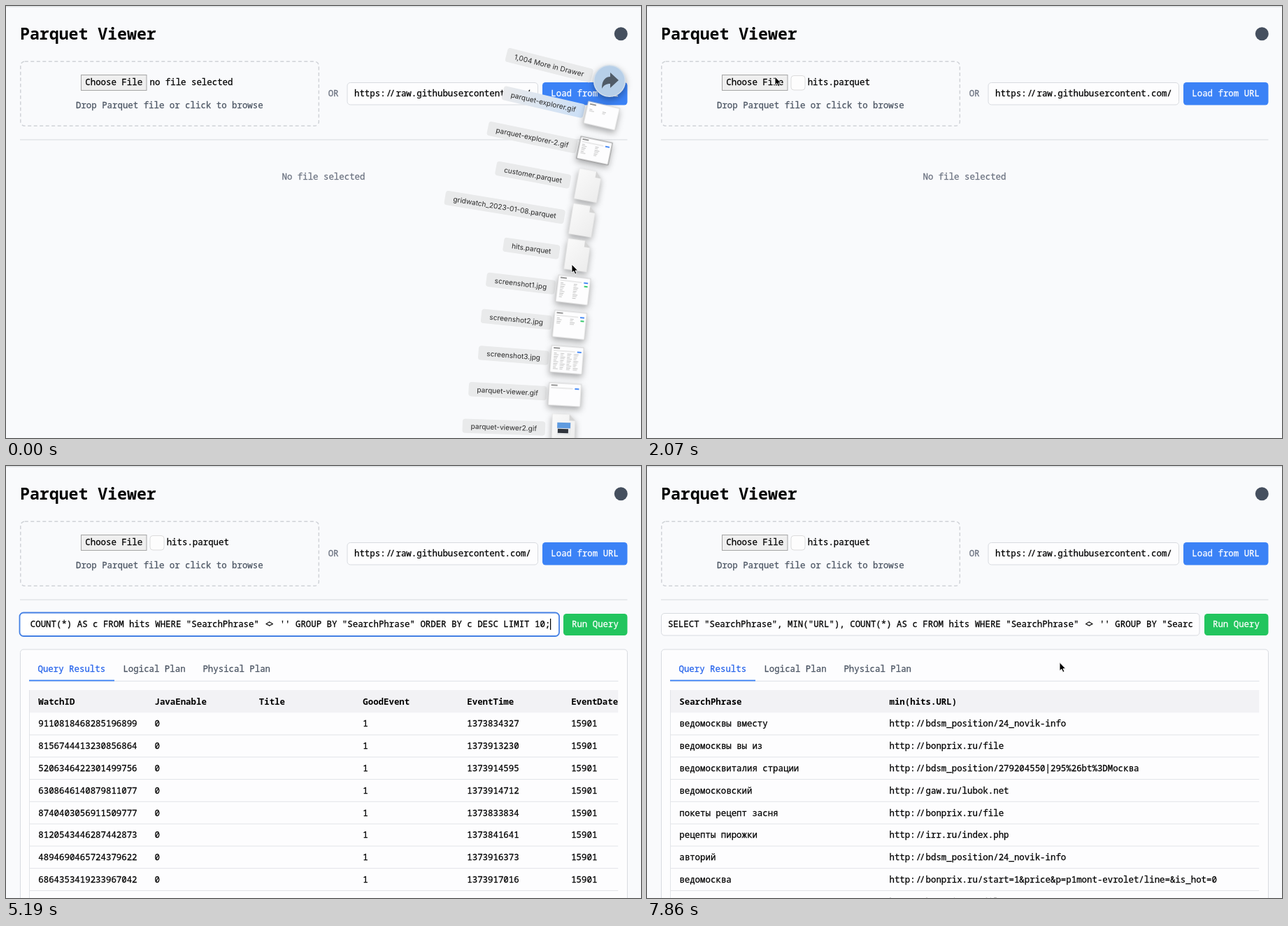
Write an HTML page that moves like this. It is 908 by 617 pixels and loops after 8000 ms.

```html
<!DOCTYPE html>
<html lang="en">
<head>
<meta charset="utf-8">
<title>Parquet Viewer</title>
<style>
  html, body { margin: 0; width: 100%; height: 100%; overflow: hidden; background: #f9fafc; }
  svg { display: block; width: 908px; height: 617px; }
  text { font: 12.4px "Noto Sans Mono", "DejaVu Sans Mono", monospace; white-space: pre; stroke-width: .28px; }
  .bold { font-weight: 600; stroke-width: 0; }
  .title { font-size: 23.2px; font-weight: 700; stroke-width: 0; }
  .label { font: 10.1px Inter, sans-serif; stroke-width: 0; }
  .shadow { filter: drop-shadow(0 4px 5px #0005); }
</style>
</head>
<body>
<script>
const STEP = 148.1, LOOP = 8000, CHAR = 7.44;
const INITIAL = 'select * from "hits" limit 10';
const QUERY = 'SELECT "SearchPhrase", MIN("URL"), COUNT(*) AS c FROM hits WHERE "SearchPhrase" <> \'\' ' +
  'GROUP BY "SearchPhrase" ORDER BY c DESC LIMIT 10;';

function el(parent, tag, attrs = {}, content) {
  const node = document.createElementNS('http://www.w3.org/2000/svg', tag);
  for (const key in attrs) node.setAttribute(key, attrs[key]);
  if (content !== undefined) node.textContent = content;
  return parent.appendChild(node);
}
const group = (parent, attrs) => el(parent, 'g', attrs);
const box = (parent, x, y, width, height, fill, attrs) =>
  el(parent, 'rect', { x, y, width, height, fill, ...attrs });
const path = (parent, d, attrs) => el(parent, 'path', { d, fill: 'none', ...attrs });
const show = (node, on) => node.setAttribute('display', on ? 'inline' : 'none');
const place = (node, x, y) => node.setAttribute('transform', `translate(${x} ${y})`);

// Pairs such as // and <> are drawn closer together, like a coding ligature
function text(parent, x, middle, content, fill = '#000', attrs) {
  const node = el(parent, 'text', { x, y: middle + 4.4, fill, stroke: fill, ...attrs });
  content.split(/(\/\/|<>)/).forEach((part, i) => {
    if (i % 2) {
      el(node, 'tspan', { dx: 1.2 }, part[0]);
      el(node, 'tspan', { dx: -2.4 }, part[1]);
    } else if (part) el(node, 'tspan', { dx: i ? 1.2 : 0 }, part);
  });
  return node;
}

const svg = el(document.body, 'svg', { viewBox: '0 0 908 617' });
const defs = el(svg, 'defs');
function clip(id, x, y, w, h) {
  box(el(defs, 'clipPath', { id }), x, y, w, h);
  return { 'clip-path': `url(#${id})` };
}
function gradient(id, from, to, x2, y2) {
  const g = el(defs, 'linearGradient', { id, x2, y2 });
  el(g, 'stop', { 'stop-color': from });
  el(g, 'stop', { offset: 1, 'stop-color': to });
}
gradient('paper', '#fafafa', '#ececec', 1, 1);
gradient('tinted', '#e9eaec', '#cbdff6', 1, 0);

// Page header
const page = group(svg);
const border = { stroke: '#d8dbe0', rx: 4.5 };
box(page, 0, 0, 908, 617, '#f9fafc');
box(page, 0, 0, 908, 1.5, '#dcdfe2');
text(page, 20, 43.8, 'Parquet Viewer', '#000', { class: 'title' });
el(page, 'circle', { cx: 879.3, cy: 39.7, r: 9.5, fill: '#454f5e' });
box(page, 20.8, 79.3, 426.5, 92, 'none', { rx: 6, stroke: '#d0d3d8', 'stroke-width': 1.5, 'stroke-dasharray': '5 3.5' });
const chooser = box(page, 107.5, 98.5, 93.5, 22, '#efefef', { stroke: '#a5a5a5' });
text(page, 113.3, 109, 'Choose File');
const noFile = text(page, 205.5, 109, 'no file selected');
const chosen = group(page);
box(chosen, 206, 99.5, 20, 20.5, '#fdfdfd', { rx: 4, stroke: '#dcdcdc' });
text(chosen, 229.7, 109, 'hits.parquet');
text(page, 100, 142, 'Drop Parquet file or click to browse', '#4b5563');
text(page, 460.7, 125, 'OR', '#6b7280');
box(page, 488, 109.5, 272.5, 31.5, '#fdfdfe', border);
text(page, 498, 125, 'https://raw.githubusercontent.com/');
box(page, 767, 109, 121.5, 32.5, '#3b82f6', { rx: 4.5 });
text(page, 779.3, 125, 'Load from URL', '#fff');
box(page, 20, 190.5, 868.5, 1, '#d8dbe0');
const empty = text(page, 394.5, 244, 'No file selected', '#6b7280');

// Query bar and results panel
const panel = group(page);
const input = box(panel, 20.5, 210.5, 769.5, 31.5, '#fdfdfe', border);
const ring = box(panel, 19.5, 209.5, 771.5, 33.5, '#fff', { rx: 5.5, stroke: '#4480e4', 'stroke-width': 1.8 });
const field = group(panel, clip('field', 30, 211, 751, 31));
const highlight = box(field, 30, 218, INITIAL.length * CHAR, 16.4, '#b4d5fe');
const initialQuery = text(field, 30, 226, INITIAL);
const query = text(field, 30, 226, QUERY);
const caret = box(panel, 778, 218, 1.2, 16, '#000');
const run = box(panel, 797, 211, 91.5, 31, '#22c55e', { rx: 4.5 });
text(panel, 809, 226, 'Run Query', '#fff');
box(panel, 20.5, 262, 868, 380, '#fdfdfe', border);
box(panel, 33, 306.7, 842.5, 1, '#dde0e5');
box(panel, 33, 305.5, 122, 1.8, '#3b82f6');
text(panel, 45.5, 289.5, 'Query Results', '#2563eb');
text(panel, 167.4, 289.5, 'Logical Plan', '#4b5563');
text(panel, 281.4, 289.5, 'Physical Plan', '#4b5563');

const tableClip = clip('table', 33, 320, 842.5, 297);
function table(columns, headers, rows) {
  const g = group(panel, tableClip);
  box(g, 33, 320, 842.5, 32.3, '#f2f2f5');
  box(g, 33, 320, 1, 297, '#e2e4e8');
  headers.forEach((h, i) => text(g, columns[i], 336.3, h, '#000', { class: 'bold' }));
  rows.forEach((row, r) => {
    const y = 368 + r * 31.78;
    row.forEach((cell, i) => text(g, columns[i], y, cell));
    box(g, 33, y + 15.5, 842.5, 1, '#e2e4e8');
  });
  return g;
}
const hits = [
  ['9110818468285196899', '1373834327'], ['8156744413230856864', '1373913230'],
  ['5206346422301499756', '1373914595'], ['6308646140879811077', '1373914712'],
  ['8740403056911509777', '1373833834'], ['8120543446287442873', '1373841641'],
  ['4894690465724379622', '1373916373'], ['6864353419233967042', '1373917016']
].map(([id, time]) => [id, '0', '', '1', time, '15901']);
const firstTable = table([46.3, 212.5, 361.8, 510.3, 659.3, 808.2],
  ['WatchID', 'JavaEnable', 'Title', 'GoodEvent', 'EventTime', 'EventDate'], hits);
const secondTable = table([46.3, 346.5], ['SearchPhrase', 'min(hits.URL)'], [
  ['ведомосквы вместу', 'http://bdsm_position/24_novik-info'],
  ['ведомосквы вы из', 'http://bonprix.ru/file'],
  ['ведомосквиталия страции', 'http://bdsm_position/279204550|295%26bt%3DМосква'],
  ['ведомосковский', 'http://gaw.ru/lubok.net'],
  ['покеты рецепт засня', 'http://bonprix.ru/file'],
  ['рецепты пирожки', 'http://irr.ru/index.php'],
  ['авторий', 'http://bdsm_position/24_novik-info'],
  ['ведомосква', 'http://bonprix.ru/start=1&price&p=p1mont-evrolet/line=&is_hot=0'],
  ['', 'http://bonprix.ru/file']
]);

// Fanned-out stack of files
function paper(parent) {
  const g = group(parent, { class: 'shadow' });
  path(g, 'M-16.5 -22H8L16.5 -13V22H-16.5Z', { fill: 'url(#paper)', stroke: '#ddd', 'stroke-width': .5 });
  path(g, 'M8 -22V-13H16.5Z', { fill: '#d4d4d4' });
}
function thumbnail(parent, i) {
  const g = group(parent, { class: 'shadow' });
  const height = i > 5 && i < 9 ? 38 : 32;
  const top = -height / 2;
  box(g, -23, top, 46, height, '#fdfdfe', { stroke: i === 2 ? '#777' : '#ccc', 'stroke-width': .8 });
  box(g, -20, top + 2.5, 9, 1.5, '#777');
  if (i !== 1) {
    box(g, -20, top + 6.5, 31, .8, '#ccc');
    box(g, 14, top + 6, 6, 2, '#4a8cf6');
  }
  if (i === 6 || i === 7) box(g, 15, top + 11, 5, 2, '#35c96b');
  const lines = { 1: 2, 2: 6, 6: 9, 7: 4, 8: 10, 9: 0 }[i];
  const columns = i === 8 ? 4 : 2;
  for (let r = 0; r < lines; r++)
    for (let c = 0; c < columns; c++)
      box(g, -19 + c * 38 / columns, top + 10 + r * 2.5, 4 + (r * 3 + c * 5) % 4, .7, '#aaa');
}

const fan = group(svg);
const names = ['1,004 More in Drawer', 'parquet-explorer.gif', 'parquet-explorer-2.gif', 'customer.parquet',
  'gridwatch_2023-01-08.parquet', 'hits.parquet', 'screenshot1.jpg', 'screenshot2.jpg', 'screenshot3.jpg',
  'parquet-viewer.gif', 'parquet-viewer2.gif'];
const items = names.map((name, i) => {
  const d = 10 - i, x = 797 + 1.4 * d + .52 * d * d, y = 107 + 49.8 * i, angle = 14.2 - 1.22 * i;
  const item = group(fan, { transform: `translate(${x} ${y}) rotate(${angle})` });
  const pill = box(item, 0, -10.7, 0, 20.4, i === 1 ? 'url(#tinted)' : '#e9eaeb', { rx: 4 });
  const label = text(item, -38, -1, name, '#2a2a2a', { class: 'label', 'text-anchor': 'end' });
  const width = label.getComputedTextLength() + 24;
  pill.setAttribute('x', -26 - width);
  pill.setAttribute('width', width);
  if (i === 0) {
    const g = group(item, { class: 'shadow', transform: `rotate(${-angle})` });
    el(g, 'circle', { r: 22.3, fill: '#b7cfe8', stroke: '#d3dfeb', 'stroke-width': 1.5 });
    path(g, 'M-11 11C-11 -2 -5 -6 1 -6V-12L13 -1L1 10V4C-5 4 -8 6 -11 11Z', { fill: '#505b67' });
  } else if (i > 2 && i < 6) paper(item);
  else if (i === 10) {
    paper(item);
    box(item, -9, -10, 19, 9, '#5f9be0');
    box(item, -9, -2, 19, 10, '#e6e8ea');
    box(item, -8, -1, 15, 6, '#30353c');
  } else thumbnail(item, i);
  return item;
});

// Pointer shapes, all with the hot spot at the origin
const ghost = group(svg, { opacity: .87 });
paper(group(ghost, { transform: 'translate(31 15) scale(1.12)' }));
const badge = group(svg);
el(badge, 'circle', { cx: 6.5, cy: 16, r: 7, fill: '#25a316', stroke: '#d9efd6', 'stroke-width': .6 });
path(badge, 'M2.5 16H10.5M6.5 12V20', { stroke: '#fff', 'stroke-width': 2 });
const outline = { stroke: '#fff', 'stroke-width': .9 };
const arrow = path(svg, 'M0 0V12L2.8 9.6L4.8 14L6.9 13.1L5 8.9H8.7Z', { ...outline, fill: '#000' });
const beam = path(svg, 'M-3 -7Q0 -7 0 -5Q0 -7 3 -7M0 -5V6M-3 8Q0 8 0 6Q0 8 3 8', { stroke: '#222' });
const hand = path(svg,
  'M-1.3 8V1Q0 -1 1.3 1V5L6 6Q7.5 6.4 7.3 8.5L6 13.5H-.5L-4.5 8.5Q-4.5 6.5 -2.8 7Z',
  { fill: '#fff', stroke: '#111', 'stroke-width': 1 });

// Pointer path: [step, x, y]
const route = [
  [0, 809, 369], [1, 811, 365], [2, 810, 362], [3, 810, 362], [4, 770, 330], [5, 480, 190], [6, 256, 104],
  [9, 172, 90], [11, 172, 90], [14, 183, 101], [15, 183, 101], [19, 560, 190], [21, 664, 264], [22, 658, 234],
  [23, 652, 225], [24, 600, 195], [26, 305, 174], [28, 240, 214], [36, 240, 220], [38, 310, 258],
  [40, 640, 266], [42, 833, 227], [51, 833, 227], [53, 590, 280.5]
];
function pointerAt(s) {
  const i = Math.max(1, route.findIndex(p => p[0] >= s));
  const [s0, x0, y0] = route[i - 1], [s1, x1, y1] = route[i];
  const k = (s - s0) / (s1 - s0);
  return [x0 + (x1 - x0) * k, y0 + (y1 - y0) * k];
}

function draw(now) {
  const s = Math.min(53, Math.floor((now % LOOP + 10) / STEP));
  const within = (from, to) => s >= from && s <= to;

  show(fan, s < 6);
  fan.setAttribute('transform', s === 5 ? 'translate(797 640) scale(.45) translate(-797 -640)' : '');
  fan.setAttribute('opacity', s === 5 ? .5 : 1);
  show(items[5], s < 4);

  chooser.setAttribute('fill', within(6, 10) ? '#b4b4b4' : '#efefef');
  show(noFile, s < 11);
  show(chosen, s >= 11);
  show(empty, s < 17);
  show(panel, s >= 17);

  const focused = within(30, 42);
  show(ring, focused);
  show(input, !focused);
  show(highlight, within(32, 34));
  show(caret, focused && !within(32, 34));
  caret.setAttribute('x', s < 35 ? 246 : 778);
  show(initialQuery, s < 35);
  show(query, s >= 35);
  place(query, within(35, 42) ? 749 - QUERY.length * CHAR : 0, 0);
  run.setAttribute('fill', within(42, 50) ? '#16a34a' : '#22c55e');
  show(firstTable, s < 51);
  show(secondTable, s >= 51);

  const typing = within(32, 35), overText = within(28, 36), overButton = within(42, 51);
  const [x, y] = pointerAt(s);
  for (const node of [ghost, badge, arrow, beam, hand]) place(node, x, y);
  show(ghost, within(4, 10));
  show(badge, within(5, 10));
  show(beam, overText && !typing);
  show(hand, overButton);
  show(arrow, !overText && !overButton);
}

const start = performance.now();
function tick() {
  draw(performance.now() - start);
  requestAnimationFrame(tick);
}
tick();
</script>
</body>
</html>
```
